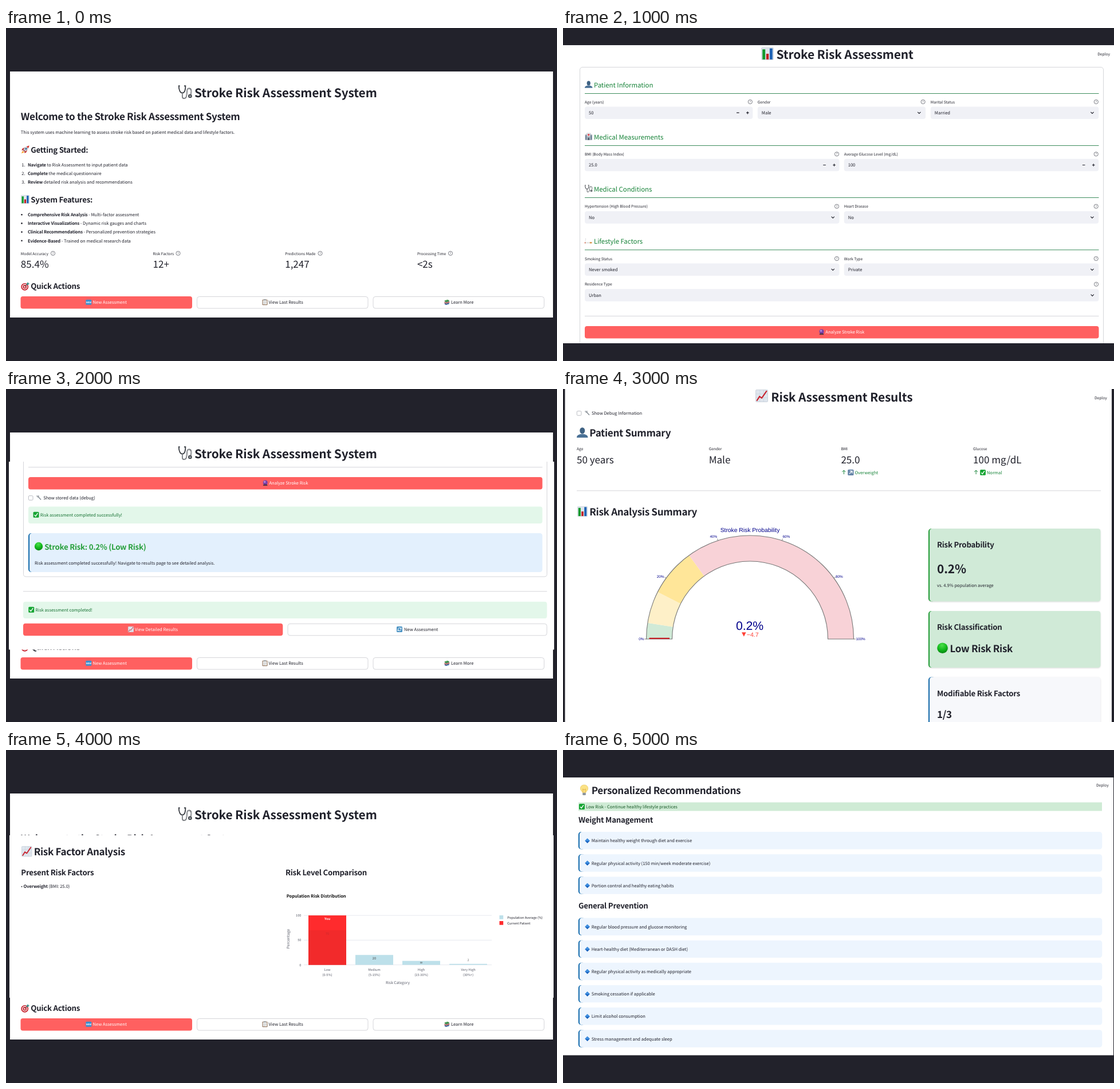
An HTML page that plays this animation: 962x582 px, repeating every 6000 ms.

```html
<!DOCTYPE html>
<html lang="en">
<head>
<meta charset="utf-8">
<title>Stroke Risk Assessment System</title>
<style>
  html, body { margin: 0; width: 100%; height: 100%; overflow: hidden; background: #22222b; }
  svg { display: block; width: 962px; height: 582px; text-rendering: geometricPrecision; white-space: pre; }
  .shadow { filter: drop-shadow(0 1px 1px rgba(0, 0, 0, .14)); }
</style>
</head>
<body>
<svg id="stage" viewBox="0 0 962 582" xmlns="http://www.w3.org/2000/svg"></svg>
<script>
const INK = '#20212b', RED = '#ff6060', GREEN = '#158237', BLUE = '#1a6fae', NAVY = '#00008b';
const EDGE = '#d5d6da', FIELD = '#f0f1f6', MINT = '#e3f7ea', SAGE = '#d0ead7', MUTED = '#585b68';
const SANS = "'Noto Sans CJK JP','Noto Sans CJK SC','Noto Sans CJK',sans-serif";
const ARIAL = "'Liberation Sans',Arial,sans-serif";
const CJK = 0.895;            // Latin glyphs of the CJK face are drawn larger per em
const H1 = 23.3, H2 = 19.04, H3 = 14.8, H4 = 12.7, BODY = 8.46, SMALL = 7.4, TINY = 6.35;

// ---- drawing helpers ----
const rect = (x, y, w, h, fill, rx = 0, extra = '') =>
  `<rect x="${x}" y="${y}" width="${w}" height="${h}" rx="${rx}" fill="${fill}" ${extra}/>`;
const path = (d, stroke, w = 1, fill = 'none') =>
  `<path d="${d}" fill="${fill}" stroke="${stroke}" stroke-width="${w}"/>`;
const rule = (x1, x2, y, color = EDGE) => path(`M${x1} ${y}H${x2}`, color);
const bold = s => `<tspan font-weight="700" letter-spacing="-.018em">${s}</tspan>`;

function text(x, y, size, str, { color = INK, weight = 400, anchor = 'start', font = SANS, rot = 0 } = {}) {
  const fs = font === SANS ? size * CJK : size;
  const gap = { 400: 0, 600: '-.018em', 700: '-.005em' }[weight];
  const turn = rot ? `transform="rotate(${rot} ${x} ${y})"` : '';
  return `<text x="${x}" y="${y}" font-family="${font}" font-size="${fs.toFixed(3)}" fill="${color}" ` +
    `font-weight="${weight === 400 ? 400 : 700}" letter-spacing="${gap}" text-anchor="${anchor}" ${turn}>${str}</text>`;
}
const head = (x, y, size, str, color = INK) => text(x, y, size, str, { color, weight: 600 });
const arial = (x, y, size, str, anchor = 'middle', color = NAVY) => text(x, y, size, str, { font: ARIAL, anchor, color });
const mid = (x, y, size, str, color = MUTED, more = {}) => text(x, y, size, str, { color, anchor: 'middle', ...more });

const help = (x, y) => `<circle cx="${x}" cy="${y}" r="3.6" fill="none" stroke="#5a5c66" stroke-width=".8"/>` +
  mid(x, y + 2, 5.8, '?', '#44464f');
const chevron = (x, y) => path(`M${x - 2.6} ${y - 1.3}l2.6 2.6l2.6 -2.6`, INK, 1.2);
const stepper = (x, y) => path(`M${x - 2.3} ${y}h4.6M${x + 14.7} ${y}h4.6M${x + 17} ${y - 2.3}v4.6`, INK, 1.2);
const checkbox = (x, y) => rect(x, y, 7.6, 7.6, '#fff', 1.5, 'stroke="#b4b6bd" stroke-width=".9"');
const deploy = (x, y) => text(x, y, SMALL, 'Deploy');

function button(x, y, w, label, tx, ico, ix, primary) {
  const box = primary ? rect(x, y, w, 21.5, RED, 4)
    : rect(x + .5, y + .5, w - 1, 20.5, '#fff', 4, `stroke="${EDGE}"`);
  return box + icon(ico, ix, y + 5.2, 10) +
    text(tx, y + 13.3, BODY, label, { color: primary ? '#fff' : INK });
}
function callout(x, y, w, h, fill, accent) {
  return rect(x, y, 12, h, accent, 5) + rect(x + 2.1, y, w - 2.1, h, fill, 4.5);
}

// ---- pictograms on a 20 x 20 grid ----
const dot = (x, y, r, fill) => `<circle cx="${x}" cy="${y}" r="${r}" fill="${fill}"/>`;
const sheet = rect(.5, .5, 19, 19, '#dfe6ee', 1, 'stroke="#b9c3cf" stroke-width=".6"');
const ICONS = {
  steth: path('M2.5 1H1C1 7 3 11 6 11S10.500 7 10.500 1H8.500M6 11V15C6 20 11 20 12 15C13 9 12 4.500 15.500 4.500S19.500 9 18 13', '#3d4147', 1.5) +
    path('M6 11V15C6 20 11 20 12 15C13 9 12 4.500 15.500 4.500S19.500 9 18 13', '#e8eaec', .6) +
    dot(17, 15.5, 2.7, '#3d4147') + dot(17, 15.5, 1.3, '#aeb4ba'),
  rocket: path('M4 13L1 19L8 16', 'none', 0, '#fda227') + path('M9 5L3 8L2 12L7 11ZM15 11L12 17L8 18L9 13Z', 'none', 0, '#c9312f') +
    path('M5 12C7 6 12 2 17 3C18 8 14 13 8 15Z', '#8c99a5', .4, '#c3ccd5') +
    path('M13.500 3.300C16 1 18 1 19.500 .500C19 2 19 4 16.800 6.600Z', 'none', 0, '#d8352f') + dot(12, 8, 2, '#2f5d8c') + path('M6 11L9 14', '#a52a2a', 1.6),
  bars: sheet + rect(2, 3, 4.5, 16, '#159a2e') + rect(8, 10, 4, 9, '#c21f24') + rect(13.5, 1.5, 4.5, 17.5, '#1f63b5'),
  dart: dot(9, 11, 8.5, '#c81f2b') + dot(9, 11, 6.3, '#f4eeee') + dot(9, 11, 4.3, '#c81f2b') + dot(9, 11, 2, '#fff') +
    path('M9 11L16 4', '#333', 1.2) + path('M13 6L14 2.500L17 0L17 3L20 3L17.500 6L14 7Z', 'none', 0, '#2e8d86'),
  fresh: rect(0, 1, 20, 18, '#3b8fd0', 3) + mid(10, 13, 9, 'NEW', '#fff', { weight: 700 }),
  clip: rect(1, 1, 18, 19, '#8a6a50', 2) + rect(3, 3, 14, 15, '#f5f5f2') + rect(6, 0, 8, 3.5, '#8f969c', 1) +
    path('M5 7H15M5 10H15M5 13H15M5 16H12', '#9aa0a6', .9),
  books: path('M2 4L13 1L18 4L7 8Z', 'none', 0, '#3f9a4c') + path('M2 4L7 8V11L2 7ZM7 8L18 4V7L7 11Z', 'none', 0, '#2d6b39') +
    path('M1 9L7 12L19 8V11L7 15L1 12Z', 'none', 0, '#b03a3a') + path('M2 13L7 15.500L18 12V16L7 19.500L2 17Z', 'none', 0, '#34609a'),
  bust: `<ellipse cx="10" cy="6.5" rx="4.6" ry="5.8" fill="#3f6283"/>` + path('M0 19C0 14 4 13.500 7.500 12.500H12.500C16 13.500 20 14 20 19Z', 'none', 0, '#4a7196'),
  hospital: rect(1, 5, 18, 14, '#8d98a5') + rect(5, 1, 10, 18, '#a9b3be') + rect(6.5, 2, 7, 7, '#fff') +
    path('M10 2.700V8.300M7.200 5.500H12.800', '#d62f3a', 2) + path('M3 8V17M17 8V17', '#56728f', 1.6) + rect(8, 13, 4, 6, '#4d5b6a'),
  cig: rect(0, 13, 14, 3.6, '#e6e6e4', .6) + rect(13, 13, 5.5, 3.6, '#d9984f', .6) + rect(0, 13, 1.6, 3.6, '#d14a2a') +
    path('M2 11C0 8 4 7 2 3', '#d6d9dc', 1.3),
  orb: dot(10, 8.5, 8, '#7a3fa8') + dot(8, 6, 3.6, '#b58ad6') + path('M4 15H16L18 19.500H2Z', 'none', 0, '#4b3340'),
  wrench: path('M5 5L16 17', '#858c93', 3) + path('M2 2.500C0 6 4 9 7.500 7.500M2 2.500L5 5L7.500 2C9 4 8.500 6 7.500 7.500', '#858c93', 1.8),
  check: rect(.5, .5, 19, 19, '#17a534', 3) + path('M4.500 10.500L8.500 15L15.500 4.500', '#fff', 2.6),
  ball: dot(10, 10, 9.6, 'url(#ball)'),
  trend: sheet + path('M.500 7H19.500M.500 13H19.500M7 .500V19.500M13 .500V19.500', '#c2ccd6', .5) + path('M2 18L6.500 11L10 13.500L18 2', '#c81f2b', 1.9),
  refresh: rect(0, 0, 20, 20, '#4a93c4', 3) + path('M4.500 9A6 6 0 0 1 15 7M15.500 11A6 6 0 0 1 5 13', '#fff', 2) +
    path('M17 3V9H11ZM3 17V11H9Z', 'none', 0, '#fff'),
  bulb: path('M10 .500C5 .500 3 4 3 7C3 11 6.500 12 7 15H13C13.500 12 17 11 17 7C17 4 15 .500 10 .500Z', '#e0b43c', .5, '#fbe285') +
    path('M8 14L7.500 8L10 9.500L12.500 8L12 14', '#d99f2b', .7) + rect(7, 15, 6, 4.5, '#8c949c', 1.4),
  diamond: path('M10 0L20 10L10 20L0 10Z', 'none', 0, '#1560bd') + path('M10 0L20 10L10 12L0 10Z', 'none', 0, '#3f8fe0'),
  upRight: rect(0, 0, 20, 20, '#6685a8', 3) + path('M5 15L14 6M7 5H15V13', '#fff', 2.4)
};
const icon = (name, x, y, size) => `<g transform="translate(${x} ${y}) scale(${size / 20})">${ICONS[name]}</g>`;

// ---- pages ----
function home() {
  let s = rect(7, 76, 948, 430, '#fff') + icon('steth', 300.500, 100, 24.500) +
    text(329, 120.800, H1, 'Stroke Risk Assessment System', { weight: 700 }) +
    head(25.800, 161, H2, 'Welcome to the Stroke Risk Assessment System') +
    text(25.800, 184.800, BODY, 'This system uses machine learning to assess stroke risk based on patient medical data and lifestyle factors.') +
    icon('rocket', 26, 205, 15) + head(43.300, 217.700, H3, 'Getting Started:') +
    icon('bars', 26, 292, 15) + head(43.300, 304.700, H3, 'System Features:') +
    icon('dart', 26, 444, 15) + head(43.300, 456, H3, 'Quick Actions');
  [['Navigate', 'to Risk Assessment to input patient data'],
   ['Complete', 'the medical questionnaire'],
   ['Review', 'detailed risk analysis and recommendations']].forEach(([a, b], i) => {
    const y = 241.500 + 15.300 * i;
    s += text(27.300, y, BODY, i + 1 + '.') + text(38, y, BODY, bold(a) + ' ' + b);
  });
  [['Comprehensive Risk Analysis', 'Multi-factor assessment'],
   ['Interactive Visualizations', 'Dynamic risk gauges and charts'],
   ['Clinical Recommendations', 'Personalized prevention strategies'],
   ['Evidence-Based', 'Trained on medical research data']].forEach(([a, b], i) => {
    const y = 329 + 15.200 * i;
    s += dot(27.500, y - 2.800, 1.300, INK) + text(38, y, BODY, bold(a) + ' - ' + b);
  });
  [['Model Accuracy', '85.4%', 82], ['Risk Factors', '12+', 300.500],
   ['Predictions Made', '1,247', 548.500], ['Processing Time', '&lt;2s', 776]].forEach(([a, b, hx], i) => {
    const x = 25.800 + 230.700 * i;
    s += text(x, 396.600, SMALL, a) + help(hx, 393.800) + text(x, 419, H2, b);
  });
  return s + button(25.500, 469, 299.500, 'New Assessment', 151.500, 'fresh', 139.300, true) +
    button(333, 469, 299.500, 'View Last Results', 458.500, 'clip', 447, false) +
    button(640.500, 469, 299.500, 'Learn More', 777, 'books', 764.800, false);
}

function form() {
  const field = (x, w, y, label, value, kind) => {
    const end = x + w, cy = y + 10.700;
    return text(x, y - 5.900, SMALL, label) + help(end - 4.500, y - 8.500) + rect(x, y, w, 21.500, FIELD, 4) +
      text(x + 7, cy + 2.900, BODY, value) + (kind === 'num' ? stepper(end - 26, cy) : chevron(end - 11.300, cy));
  };
  const section = (y, ico, label) => icon(ico, 38, y - 7.500, 13.500) +
    text(54, y + 4.300, H4, label, { color: GREEN }) + rule(38, 935.500, y + 15, '#3d8d5d');
  const L = 38, R = 490.700, W = 444.500;
  return rect(0, 30, 962, 521, '#fff') + icon('bars', 346, 34, 22) +
    text(372.500, 53.500, H1, 'Stroke Risk Assessment', { weight: 700 }) + deploy(933.300, 48) +
    rect(29.500, 68.500, 914, 520, 'none', 4.500, `stroke="${EDGE}"`) +
    section(99.500, 'bust', 'Patient Information') +
    field(L, 293.300, 137.500, 'Age (years)', '50', 'num') +
    field(339.800, 293.300, 137.500, 'Gender', 'Male') +
    field(641.800, 293.500, 137.500, 'Marital Status', 'Married') +
    section(190.500, 'hospital', 'Medical Measurements') +
    field(L, W, 228.800, 'BMI (Body Mass Index)', '25.0', 'num') +
    field(R, W, 228.800, 'Average Glucose Level (mg/dL)', '100', 'num') +
    section(281.500, 'steth', 'Medical Conditions') +
    field(L, W, 320.200, 'Hypertension (High Blood Pressure)', 'No') +
    field(R, W, 320.200, 'Heart Disease', 'No') +
    section(372.800, 'cig', 'Lifestyle Factors') +
    field(L, W, 411.500, 'Smoking Status', 'Never smoked') +
    field(R, W, 411.500, 'Work Type', 'Private') +
    field(L, 897.500, 456.300, 'Residence Type', 'Urban') +
    rule(38, 935.500, 503.500) + button(38, 521, 897.500, 'Analyze Stroke Risk', 458.300, 'orb', 446.500, true) +
    rect(0, 551, 962, 31, '#22222b');
}

function analyzed() {
  return rect(5, 127, 952, 328.500, '#fff') +
    path('M30.500 127V323.500Q30.500 328 35 328H940Q944.500 328 944.500 323.500V127', EDGE) +
    rule(39, 936.500, 136.700) + button(39, 154, 897.500, 'Analyze Stroke Risk', 459.500, 'orb', 447.700, true) +
    checkbox(39.400, 186.600) + icon('wrench', 53, 185, 10) + text(65.200, 193, BODY, 'Show stored data (debug)') +
    rect(39, 205.500, 897.500, 29.500, MINT, 4) + icon('check', 47.300, 214.500, 10.500) +
    text(59.800, 222.500, BODY, 'Risk assessment completed successfully!', { color: '#177233' }) +
    callout(39, 252, 897.500, 68, '#e3f0fd', BLUE) + icon('ball', 49.500, 267.500, 15) +
    head(67.200, 280.500, H3, 'Stroke Risk: 0.2% (Low Risk)', '#28a03c') +
    text(50, 307, BODY, 'Risk assessment completed successfully! Navigate to results page to see detailed analysis.') +
    rule(30, 944.500, 353.700) + rect(30, 371.800, 914.500, 29.300, MINT, 4) + icon('check', 39, 380.500, 10.500) +
    text(51.300, 388.800, BODY, 'Risk assessment completed!', { color: '#177233' }) +
    button(30, 409.800, 453.300, 'View Detailed Results', 225, 'trend', 213, true) +
    button(491.500, 409.800, 453.300, 'New Assessment', 695, 'refresh', 682, false);
}

function gauge(cx, cy, R, r) {
  const at = (p, rad) => {
    const a = Math.PI * (1 - p / 100);
    return `${(cx + rad * Math.cos(a)).toFixed(2)} ${(cy - rad * Math.sin(a)).toFixed(2)}`;
  };
  const ring = (a, b) => `M${at(a, R)}A${R} ${R} 0 0 1 ${at(b, R)}L${at(b, r)}A${r} ${r} 0 0 0 ${at(a, r)}Z`;
  let s = path(ring(0, 5), 'none', 0, SAGE) + path(ring(5, 15), 'none', 0, '#fef0c8') +
    path(ring(15, 30), 'none', 0, '#ffe699') + path(ring(30, 100), 'none', 0, '#f8d2d7') +
    path(ring(0, 100), '#777', 1.100) + rect(150.500, 434.800, 35.500, 2.200, '#c41e25');
  [[0, 141.500, 439.300], [20, 176.500, 329.700], [40, 269.200, 260.200],
   [60, 383.400, 260.200], [80, 476, 329.700], [100, 511.500, 439.300]].forEach(([p, x, y]) => {
    s += path(`M${at(p, R)}L${at(p, R + 3.400)}`, '#555', .7) + arial(x, y, TINY, p + '%', p < 50 ? 'end' : 'start');
  });
  return s + arial(cx, 249.700, 10.300, 'Stroke Risk Probability') + arial(cx - .5, 420.500, 21.160, '0.2%') +
    path('M312 425.300H319.600L315.800 432.700Z', 'none', 0, '#ff4136') + arial(320.800, 432.700, 10.580, '−4.7', 'start', '#ff4136');
}

function results() {
  const card = (y, h, fill, accent) => `<g class="shadow">${callout(638, y, 300.500, h, fill, accent)}</g>`;
  let s = rect(3.500, 0, 954.500, 582, '#fff') + icon('trend', 336, 1, 22) +
    text(363.300, 21.500, H1, 'Risk Assessment Results', { weight: 700 }) + deploy(928, 18) +
    checkbox(24.300, 38.600) + icon('wrench', 38, 37, 10) + text(50, 45.300, BODY, 'Show Debug Information') +
    icon('bust', 24, 66.500, 19.500) + head(46.300, 83, H2, 'Patient Summary');
  [['Age', '50 years'], ['Gender', 'Male'], ['BMI', '25.0', 'upRight', 'Overweight'],
   ['Glucose', '100 mg/dL', 'check', 'Normal']].forEach(([a, b, ico, note], i) => {
    const x = 24 + 230.700 * i;
    s += text(x, 106.600, SMALL, a) + text(x, 129.500, H2, b);
    if (note) s += path(`M${x + 5} 149V142.300M${x + 2} 145L${x + 5} 142L${x + 8} 145`, GREEN, 1) +
      icon(ico, x + 11.800, 140.700, 10.300) + text(x + 24, 148.500, BODY, note, { color: GREEN });
  });
  return s + rule(24, 939, 177.800) + icon('bars', 25, 205, 18) + head(46.300, 221, H2, 'Risk Analysis Summary') +
    gauge(326.500, 437, 181, 136) +
    card(244, 127.300, SAGE, '#28a03c') + head(653, 276.500, H3, 'Risk Probability') +
    text(653, 322, H1, '0.2%', { weight: 700 }) + text(653, 345.500, BODY, 'vs. 4.9% population average') +
    card(388, 99, SAGE, '#28a03c') + head(653, 421, H3, 'Risk Classification') +
    icon('ball', 652.800, 443, 19.500) + head(675.500, 459.700, H2, 'Low Risk Risk') +
    card(503.500, 110, '#f7f8fb', BLUE) + head(653, 536.800, H3, 'Modifiable Risk Factors') + head(653, 575, H2, '1/3');
}

function factors() {
  const base = 375.500, k = .864, sky = '#bde0ea';
  let s = rect(6, 149, 950, 284, '#fff') + icon('trend', 27, 168, 18.500) + head(48.700, 184.300, H2, 'Risk Factor Analysis') +
    head(26.300, 218.500, H3, 'Present Risk Factors') + text(26.300, 241, BODY, '• ' + bold('Overweight') + ' (BMI: 25.0)') +
    head(488, 218.500, H3, 'Risk Level Comparison') +
    text(489.700, 258, BODY, 'Population Risk Distribution', { weight: 700, color: '#111' });
  [0, 50, 100].forEach(v => {
    const y = base - v * k;
    s += rule(520, 848, y, '#e7e9ef') + text(515.500, y + 2.100, TINY, v, { anchor: 'end', color: MUTED });
  });
  [['Low', '0-5%', 70], ['Medium', '5-15%', 20], ['High', '15-30%', 8], ['Very High', '30%+', 2]].forEach(([a, b, v], i) => {
    const x = 561 + 82 * i;
    s += rect(x - 33, base - v * k, 66, v * k, sky) +
      mid(x, 386.300, TINY, a) + mid(x, 394.800, TINY, `(${b})`);
  });
  return s + rect(528, base - 100 * k, 66, 100 * k, '#ff2b2d') + rect(528, base - 70 * k, 66, 70 * k, '#f22a2b') +
    mid(561, 297.300, TINY, 'You', '#fff', { weight: 600 }) + mid(561, 323, TINY, '70', '#c92a2c') +
    mid(643, 366.300, TINY, '20', '#444') + mid(723, 371.500, TINY, '8', '#444', { rot: 90 }) + mid(807, 369.200, TINY, '2', '#777') +
    mid(495.300, 330, SMALL, 'Percentage', MUTED, { rot: -90 }) + mid(684, 408.500, SMALL, 'Risk Category') +
    rect(861.500, 289, 6.700, 6.700, sky) + text(875.300, 294.700, TINY, 'Population Average (%)') +
    rect(861.500, 299, 6.700, 6.700, '#ff2b2d') + text(875.300, 304.700, TINY, 'Current Patient');
}

function advice() {
  const list = (y, items) => items.map((str, i) => {
    const top = y + 39.150 * i;
    return callout(26.800, top, 914.500, 30.400, '#edf5fe', BLUE) + icon('diamond', 38.300, top + 11.300, 8.500) +
      text(49.700, top + 18.300, BODY, str);
  }).join('');
  return rect(0, 48, 961, 485.500, '#fff') + icon('bulb', 27.500, 60.500, 19) +
    head(49.700, 77, H2, 'Personalized Recommendations') + deploy(931, 64) +
    rect(27, 91.500, 914, 15, '#cfebd5') + icon('check', 27.700, 93.800, 10.500) +
    text(40, 102, BODY, 'Low Risk - Continue healthy lifestyle practices', { color: '#155724' }) +
    head(27, 126.700, H3, 'Weight Management') +
    list(143.100, ['Maintain healthy weight through diet and exercise',
      'Regular physical activity (150 min/week moderate exercise)', 'Portion control and healthy eating habits']) +
    head(27, 277, H3, 'General Prevention') +
    list(293.500, ['Regular blood pressure and glucose monitoring', 'Heart-healthy diet (Mediterranean or DASH diet)',
      'Regular physical activity as medically appropriate', 'Smoking cessation if applicable',
      'Limit alcohol consumption', 'Stress management and adequate sleep']);
}

// ---- playback: one page per second, hard cuts ----
const pages = ['', form(), analyzed(), results(), factors(), advice()];
const stage = document.getElementById('stage');
stage.innerHTML = `<defs><radialGradient id="ball" cx=".45" cy=".25" r=".8">
  <stop offset="0" stop-color="#4be04a"/><stop offset=".55" stop-color="#12b81c"/><stop offset="1" stop-color="#067d12"/>
  </radialGradient></defs>` + rect(0, 0, 962, 582, '#22222b') +
  `<g id="home">${home()}</g>` + pages.map(p => `<g class="page">${p}</g>`).join('');
const homeLayer = document.getElementById('home');
const layers = [...stage.querySelectorAll('.page')];

function render(ms) {
  const now = Math.floor(ms % 6000 / 1000);
  homeLayer.style.display = now % 2 ? 'none' : '';
  layers.forEach((g, i) => { g.style.display = i === now ? '' : 'none'; });
}
const start = performance.now();
function tick() {
  render(performance.now() - start);
  requestAnimationFrame(tick);
}
tick();
</script>
</body>
</html>
```
